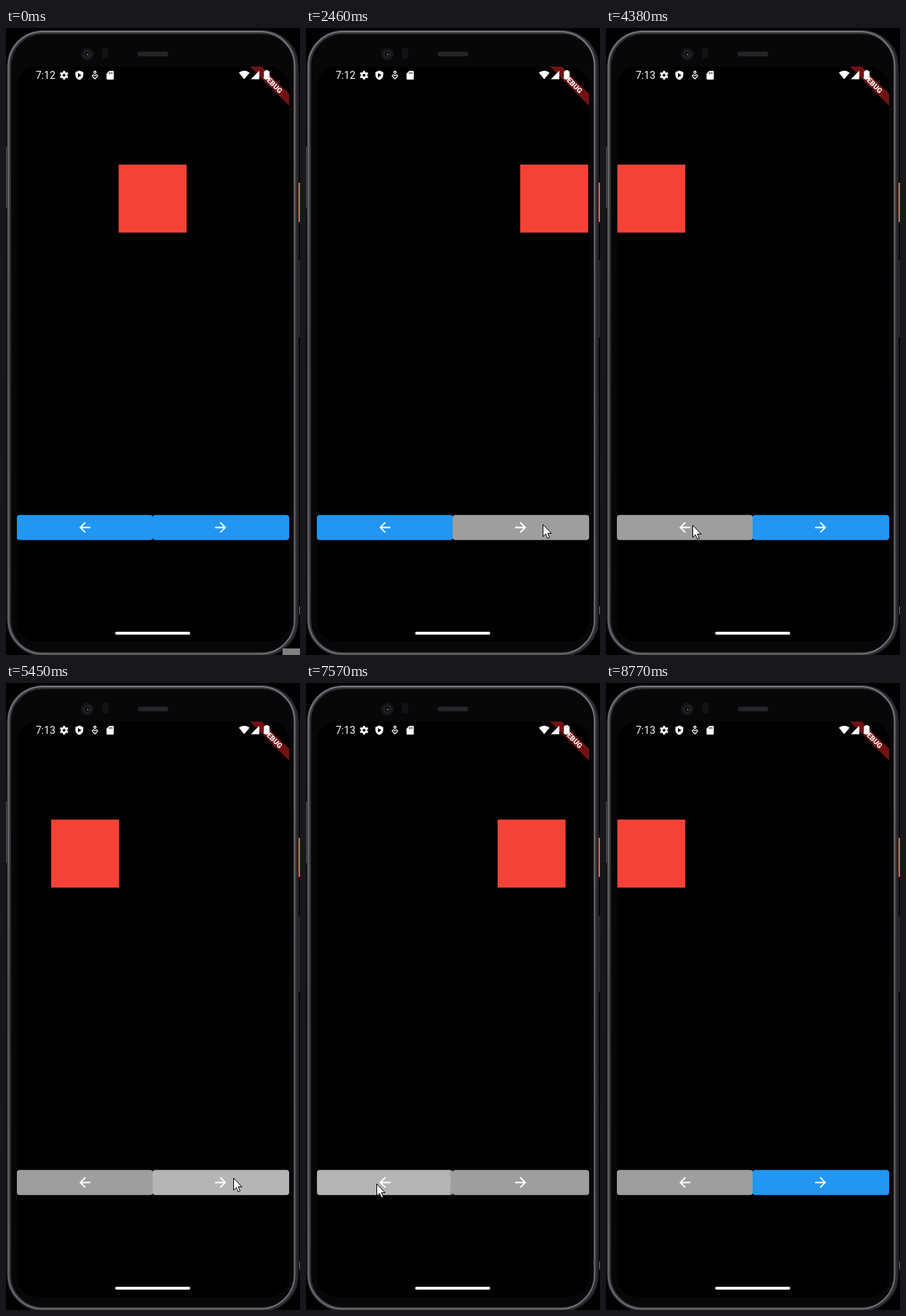
Recreate the animation shown at these times as an HTML page. Size 405x863 px, loop 9.16 s.

```html
<!DOCTYPE html>
<html lang="en">
<head>
<meta charset="utf-8">
<title>Sliding box</title>
<style>
  html, body { margin: 0; width: 100%; height: 100%; overflow: hidden; background: #000; }
  svg { display: block; width: 100%; height: 100%; }
  text { font-family: Roboto, "Open Sans", sans-serif; fill: #fff; }
</style>
</head>
<body>
<svg viewBox="0 0 405 863" preserveAspectRatio="none">
  <defs>
    <linearGradient id="rim" x1="0" y1="0" x2="0" y2="1">
      <stop offset="0" stop-color="#77777a"/>
      <stop offset=".25" stop-color="#6c6c6f"/>
      <stop offset=".5" stop-color="#5a5a5c"/>
      <stop offset="1" stop-color="#6e6e70"/>
    </linearGradient>
    <clipPath id="screen"><rect x="15" y="53" width="375" height="792" rx="28"/></clipPath>
    <clipPath id="leftClip"><rect x="15" y="670.2" width="187.4" height="34.5" rx="3.8"/></clipPath>
    <clipPath id="rightClip"><rect x="202" y="670.2" width="188" height="34.5" rx="3.8"/></clipPath>
  </defs>

  <!-- phone body -->
  <rect x="0" y="163" width="1" height="85" fill="#4c4c4e"/>
  <rect x="1.5" y="3.5" width="401" height="861" rx="49" fill="#060607" stroke="#2e2e30"/>
  <rect x="4.5" y="6" width="394.5" height="855.5" rx="46" fill="none" stroke="#303032" stroke-width="5"/>
  <rect x="3.5" y="5" width="394" height="856.5" rx="47" fill="none" stroke="url(#rim)" stroke-width="2"/>
  <rect x="8" y="9.5" width="387" height="849" rx="43" fill="#070708"/>
  <rect x="403" y="213" width="2" height="54" fill="#e5574d"/>
  <rect x="403" y="320" width="2" height="106" fill="#242425"/>
  <rect x="404" y="796" width="1" height="11" fill="#777"/>
  <circle cx="112" cy="36" r="9" fill="#141416"/>
  <circle cx="112" cy="36" r="5.5" fill="#26262a"/>
  <circle cx="112" cy="36" r="3.4" fill="#0a0a0c"/>
  <circle cx="112.5" cy="36.5" r="1.3" fill="#6a6b70"/>
  <rect x="132" y="27" width="9" height="15" rx="4" fill="#121214"/>
  <rect x="181.5" y="32.5" width="42" height="6.5" rx="3.2" fill="#252527"/>
  <rect x="15" y="53" width="375" height="792" rx="28"/>

  <!-- app -->
  <g clip-path="url(#screen)">
    <rect id="box" y="188" width="93.6" height="93.6" fill="#f44336"/>
    <g clip-path="url(#leftClip)">
      <rect id="left" x="15" y="670" width="188" height="35"/>
      <circle id="leftInk" fill="#fff"/>
    </g>
    <g clip-path="url(#rightClip)">
      <rect id="right" x="202" y="670" width="188" height="35"/>
      <circle id="rightInk" fill="#fff"/>
    </g>
    <path id="arrow" transform="translate(97.2 676) scale(.955)" fill="#fff"
      d="M20 11H7.83l5.59-5.59L12 4l-8 8 8 8 1.41-1.41L7.83 13H20z"/>
    <use href="#arrow" transform="translate(404.4 0) scale(-1 1)"/>
    <g transform="translate(390 53) rotate(45) scale(.955)">
      <rect x="-40" y="28" width="80" height="12" fill="#b71c1c" fill-opacity=".63"/>
      <text x="1.2" y="37.7" font-size="10.4" font-weight="900" text-anchor="middle">DEBUG</text>
    </g>
  </g>

  <!-- status bar -->
  <text id="clock" x="41" y="70" font-size="14"></text>
  <g fill="#fff">
    <g transform="translate(80 65)">
      <circle r="3.2" fill="none" stroke="#fff" stroke-width="2.6"/>
      <g stroke="#fff" stroke-width="2.7">
        <path d="M0-6V-3.6M0 6V3.6"/>
        <path d="M0-6V-3.6M0 6V3.6" transform="rotate(60)"/>
        <path d="M0-6V-3.6M0 6V3.6" transform="rotate(120)"/>
      </g>
    </g>
    <path d="M101 58.5l5.4 2.2v3.8c0 3.2-2.3 6.2-5.4 7-3.1-.8-5.4-3.8-5.4-7v-3.8z"/>
    <path d="M99.2 62v6l4.8-3z" fill="#000"/>
    <g fill="none" stroke="#fff" stroke-width="1.3">
      <circle cx="122.5" cy="61" r="1.5"/>
      <path d="M122.5 70l-3.4-3.4c-.8-1.4 1.2-3 2.6-1.5l.8.8.8-.8c1.4-1.5 3.4.1 2.6 1.5z"/>
    </g>
    <path d="M142.3 59h5a1.2 1.2 0 0 1 1.2 1.2v9.6a1.2 1.2 0 0 1-1.2 1.2h-7.6a1.2 1.2 0 0 1-1.2-1.2v-7z"/>
    <path d="M142.3 61v2.2M144.2 61v2.2M146.1 61v2.2" stroke="#000" stroke-width=".9"/>
    <path d="M320.8 61.6q7.4-5.6 14.8 0L328.2 70.6z"/>
    <path d="M349 58.8V70.5H337.3z"/>
    <path d="M357.5 58h3.4v1.3h1.2a1 1 0 0 1 1 1v9a1 1 0 0 1-1 1h-5.8a1 1 0 0 1-1-1v-9a1 1 0 0 1 1-1h1.2z"/>
  </g>
  <rect x="150.3" y="831" width="103.5" height="4" rx="2" fill="#f2f2f2"/>

  <rect id="corner" x="381" y="854" width="24" height="9" fill="#808080"/>
  <path id="cursor" d="M.5.5V17l3.8-3.6 2.6 6 2.6-1.1-2.5-5.8h5z" fill="#fff" stroke="#000" stroke-linejoin="round"/>
</svg>
<script>
const LOOP = 9160, TICKS = 138, TICK_MS = 1000 / 15;
const SLIDE = 15, HOLD_MS = 120;
const BLUE = "#2196f3", GREY = "#9e9e9e";
const EDGE = { left: 15.6, mid: 155.2, right: 295.1 };
const MID_X = { left: 108.6, right: 296.1 }, MID_Y = 687.4;

// times below are in ticks of 1/15 s
const slides = [
  { at: 15.5, from: "mid", to: "right", tap: [330, 683] },
  { at: 49.75, from: "right", to: "left", tap: [119, 684] },
  { at: 79.5, from: "left", to: "right", tap: [313, 681] },
  { at: 112.33, from: "right", to: "left", tap: [97, 689] }
];
const moves = [
  [4, 13, 377, 861, 330, 683],
  [36, 42, 330, 683, 119, 684],
  [68, 74, 119, 684, 313, 681],
  [100, 106, 313, 681, 96, 688],
  [108, 109, 96, 688, 97, 689],
  [115, 124, 97, 689, 389, 827],
  [130, 131, 389, 827, 389, 842]
];

const $ = id => document.getElementById(id);
const clamp = v => Math.min(1, Math.max(0, v));
const mix = (a, b, p) => a + (b - a) * p;
const inOut = p => p < .5 ? 4 * p ** 3 : 1 - 4 * (1 - p) ** 3;
const out = p => 1 - (1 - p) ** 2.3;
const show = (el, on) => el.setAttribute("visibility", on ? "visible" : "hidden");
const set = (el, attrs) => {
  for (const key in attrs) el.setAttribute(key, attrs[key]);
};

function drawSlide(n) {
  let x = EDGE.mid, left = BLUE, right = BLUE;
  for (const s of slides) {
    if (n < s.at) break;
    x = mix(EDGE[s.from], EDGE[s.to], clamp((n - s.at) / SLIDE));
    const done = n > s.at + SLIDE + .3;
    left = done && s.to === "right" ? BLUE : GREY;
    right = done && s.to === "left" ? BLUE : GREY;
  }
  set($("box"), { x });
  set($("left"), { fill: left });
  set($("right"), { fill: right });
}

function drawInk(n) {
  show($("leftInk"), false);
  show($("rightInk"), false);
  for (const s of slides) {
    const ms = (n - s.at) * TICK_MS, held = ms + HOLD_MS;
    if (held < 0 || ms > 375) continue;
    const ink = $(s.to + "Ink");
    const p = out(clamp(ms < 0 ? held / 1000 : HOLD_MS / 1000 + ms / 225));
    set(ink, {
      cx: mix(s.tap[0], MID_X[s.to], p),
      cy: mix(s.tap[1], MID_Y, p),
      r: mix(28.5, 100, p),
      opacity: .24 * clamp(held / 75) * (1 - clamp((ms - 225) / 150))
    });
    show(ink, true);
  }
}

function drawCursor(n) {
  let x = 0, y = 0;
  for (const [a, b, x0, y0, x1, y1] of moves) {
    if (n < a) break;
    const p = inOut(clamp((n - a) / (b - a)));
    x = mix(x0, x1, p);
    y = mix(y0, y1, p);
  }
  set($("cursor"), { transform: `translate(${Math.round(x)} ${Math.round(y)})` });
  show($("cursor"), n >= 5 && n < 132);
}

function draw(t) {
  const n = Math.floor(t / LOOP * TICKS + .02);
  drawSlide(n);
  drawInk(n);
  drawCursor(n);
  show($("corner"), n < 1);
  $("clock").textContent = n < 52 ? "7:12" : "7:13";
}

const begin = performance.now();
function loop() {
  draw((performance.now() - begin) % LOOP);
  requestAnimationFrame(loop);
}
loop();
</script>
</body>
</html>
```
